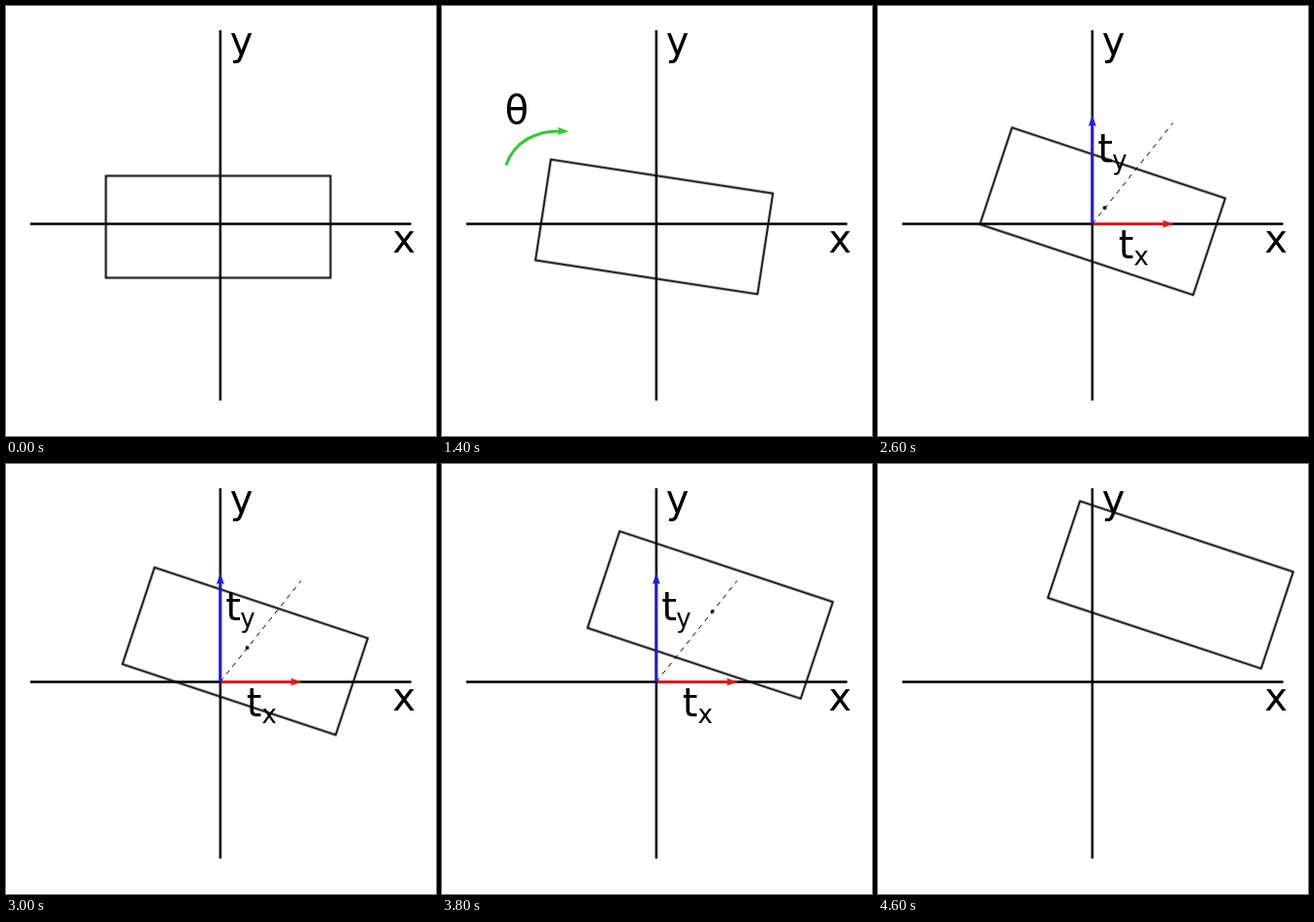
Write an HTML page that moves like this. It is 443 px wide and 443 px high and loops after 5600 ms.

```html
<!DOCTYPE html>
<html lang="en">
<head>
<meta charset="utf-8">
<title>Rotation and translation</title>
<style>
  html, body { margin: 0; width: 100%; height: 100%; overflow: hidden; background: #fff; }
  svg { display: block; width: 100vw; height: 100vh; }
  text { font: 40px "DejaVu Sans", sans-serif; }
  .sub { font-size: 26px; }
  .line { fill: none; stroke: #000; stroke-width: 2; }
  .axis { stroke-width: 2.5; }
  .arrow { fill: currentColor; }
  .arrow .shaft { fill: none; stroke: currentColor; stroke-width: 3; }

  /* One loop is 5.6 s; a step of 200 ms is 3.571 % */
  .turn, .move, .angle, .shift, .dot { animation: 5.6s step-end infinite; }
  .turn { animation-name: turn; }
  .move { animation-name: move; }
  .angle { animation-name: angle; }
  .shift { animation-name: shift; }
  .dot { animation-name: dot; }

  @keyframes turn {
    0% { transform: rotate(0deg); }
    21.42% { transform: rotate(4.5deg); }
    24.99% { transform: rotate(8.7deg); }
    28.56% { transform: rotate(11.7deg); }
    32.13% { transform: rotate(15.5deg); }
    35.7%, 100% { transform: rotate(18.36deg); }
  }
  @keyframes move {
    0% { transform: translate(0, 0); }
    42.85% { transform: translate(5.26px, -6.67px); animation-timing-function: steps(10); }
    78.55% { transform: translate(80.16px, -99.97px); }
    78.56%, 100% { transform: translate(82.8px, -103px); }
  }
  @keyframes angle {
    0%, 39.28%, 100% { visibility: hidden; }
    17.85% { visibility: visible; }
  }
  @keyframes shift {
    0%, 82.13%, 100% { visibility: hidden; }
    39.28% { visibility: visible; }
  }
  @keyframes dot {
    0%, 82.13%, 100% { visibility: hidden; }
    42.85% { visibility: visible; }
  }
</style>
</head>
<body>
<svg viewBox="0 0 443 443">
  <defs>
    <path id="head" d="M0 0L-12 4Q-9.5 0 -12 -4Z"/>
  </defs>

  <path class="line axis" d="M25 224.4H417.5M220.8 25V406.5"/>
  <text x="230.7" y="49.5">y</text>
  <text x="398.3" y="254">x</text>

  <g class="move">
    <g transform="translate(218.6 227.5)">
      <rect class="line turn" x="-115.7" y="-52.5" width="231.4" height="105"/>
    </g>
    <circle class="dot" cx="220.8" cy="224" r="1.9"/>
  </g>

  <g class="angle">
    <text x="64.8" y="120.5">θ</text>
    <g class="arrow" color="#32c832">
      <path class="shaft" d="M66 164C74 140 97 128 123 129"/>
      <use href="#head" transform="translate(131 129.2) rotate(2)"/>
    </g>
  </g>

  <g class="shift">
    <path class="line" style="stroke-width:1" stroke-dasharray="5 5" d="M220.8 224.4L304 120.3"/>
    <g class="arrow" color="#e01b1b">
      <path class="shaft" d="M222 224.4H296"/>
      <use href="#head" transform="translate(305 224.4)"/>
    </g>
    <g class="arrow" color="#1e1ee0">
      <path class="shaft" d="M220.8 224.4V121"/>
      <use href="#head" transform="translate(220.8 112) rotate(-90)"/>
    </g>
    <text x="226.2" y="161">t</text>
    <text class="sub" x="241.3" y="168">y</text>
    <text x="247.8" y="259.5">t</text>
    <text class="sub" x="263.4" y="266.5">x</text>
  </g>
</svg>
</body>
</html>
```
